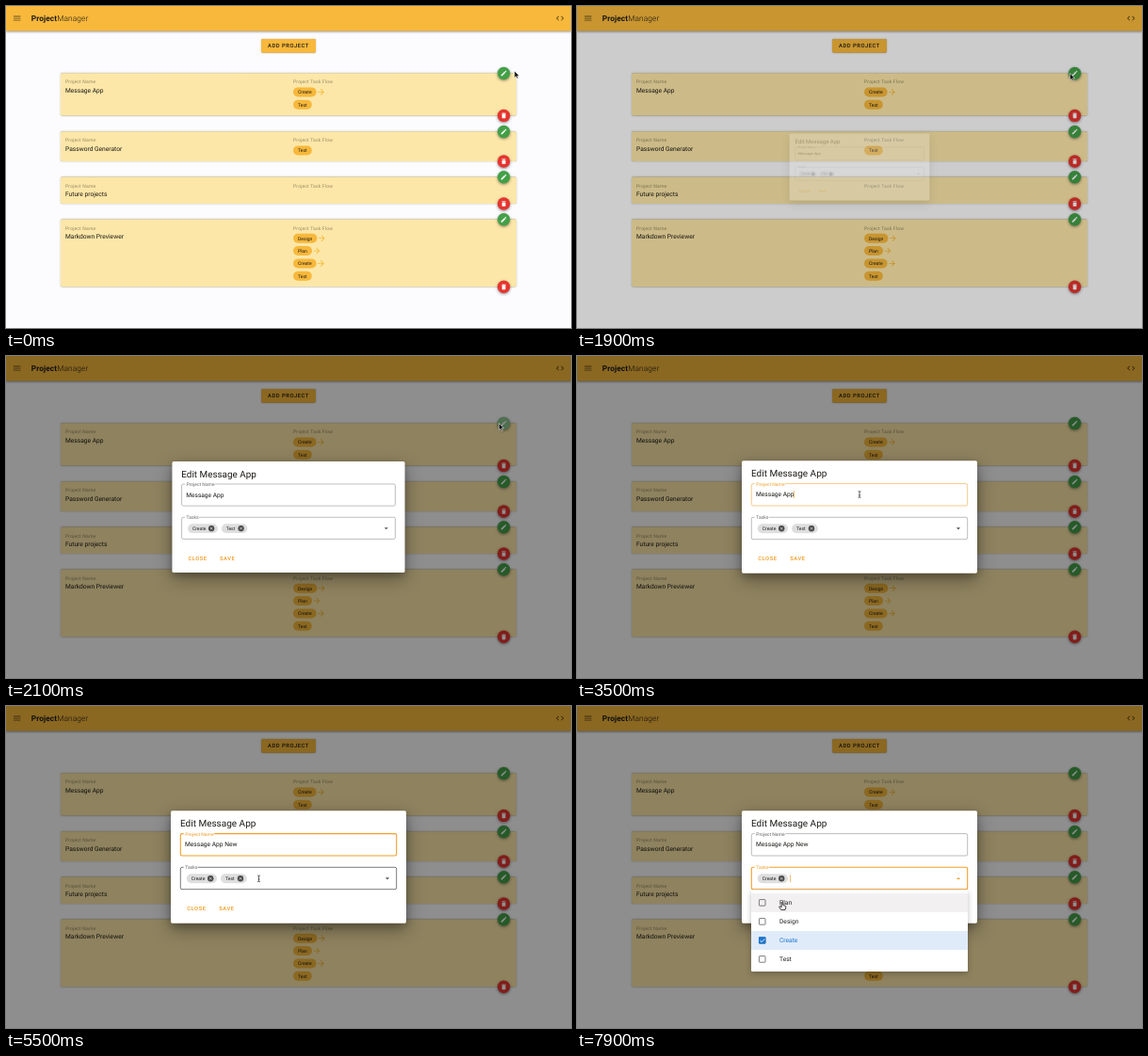
An HTML page that plays this animation: 600 px wide and 342 px high, repeating every 8 s.

```html
<!DOCTYPE html>
<html lang="en">
<head>
<meta charset="utf-8">
<title>Project list</title>
<style>
html, body { margin: 0; width: 100%; height: 100%; overflow: hidden; background: #fcfcfe; }
svg { display: block; width: 600px; height: 342px; font-family: Roboto, sans-serif; font-size: 6.67px; text-rendering: geometricPrecision; cursor: default; fill: #1c1a16; }
.caption { font-size: 5px; letter-spacing: .0333em; fill: #000; fill-opacity: .4; }
.label, .chip { font-size: 5px; }
.label { fill: #666; }
.button { font-size: 5.83px; font-weight: 500; letter-spacing: .0892em; }
.bar { filter: drop-shadow(0 1px 1.2px rgba(0,0,0,.4)); }
.raised { filter: drop-shadow(0 .8px .5px rgba(0,0,0,.35)) drop-shadow(0 .4px 1px rgba(0,0,0,.2)); }
.fab { filter: drop-shadow(0 1.3px 1.4px rgba(0,0,0,.45)); }
.floating { filter: drop-shadow(0 2px 3px rgba(0,0,0,.25)); }
.modal { filter: drop-shadow(0 3px 4px rgba(0,0,0,.2)) drop-shadow(0 6px 9px rgba(0,0,0,.35)); }
.field { fill: #fff; stroke: #999; stroke-width: .65; }
.hover .field { stroke: #333; }
.focus .field { stroke: #f2a02c; }
.focus .label, .focus .arrow { fill: #f2a02c; }
</style>
</head>
<body>
<svg id="stage" viewBox="0 0 600 342"></svg>
<script>
const AMBER = '#f7b83b', ORANGE = '#f0991c';
const LOOP = 8000, OPEN = 1880, FOCUS = 3440, MENU = 5900, UNCHECK = 6900;
const KEYS = [4000, 4200, 4400, 4550];

const ICONS = {
  menu: 'M3 6H21V8H3ZM3 11H21V13H3ZM3 16H21V18H3Z',
  code: 'M14.6 16.6L19.2 12L14.6 7.4L16 6L22 12L16 18ZM9.4 16.6L4.8 12L9.4 7.4L8 6L2 12L8 18Z',
  arrow: 'M4 11V13H16L10.5 18.5L11.9 19.9L19.8 12L11.9 4.1L10.5 5.5L16 11Z',
  pencil: 'M20.7 7Q21.3 6.3 20.7 5.6L18.4 3.3Q17.7 2.7 17 3.3L15.1 5.1L18.9 8.9ZM3 17.2V21H6.8L17.8 9.9L14.1 6.2Z',
  trash: 'M19 4H15.5L14.5 3H9.5L8.5 4H5V6H19ZM6 19A2 2 0 0 0 8 21H16A2 2 0 0 0 18 19V7H6Z',
  down: 'M7 10L12 15L17 10Z',
  close: 'M8 8L16 16M16 8L8 16'
};

const rect = (x, y, w, h, fill, rx = 0, extra = '') =>
  `<rect x="${x}" y="${y}" width="${w}" height="${h}" fill="${fill}" rx="${rx}" ${extra}/>`;
const text = (x, y, str, extra = '') => `<text x="${x}" y="${y}" ${extra}>${str}</text>`;
const icon = (name, cx, cy, size, fill, extra = '') =>
  `<path d="${ICONS[name]}" fill="${fill}" transform="translate(${cx} ${cy}) scale(${size / 24}) translate(-12 -12)" ${extra}/>`;

const cards = [
  { name: 'Message App', top: 71.2, bottom: 116.4, tasks: ['Create', 'Test'] },
  { name: 'Password Generator', top: 133.2, bottom: 165, tasks: ['Test'] },
  { name: 'Future projects', top: 181.4, bottom: 210, tasks: [] },
  { name: 'Markdown Previewer', top: 226.5, bottom: 298.3, tasks: ['Design', 'Plan', 'Create', 'Test'] }
];
const chipWidth = { Create: 24.6, Test: 19.8, Design: 25.4, Plan: 20 };

function flowChip(task, i, card) {
  const y = card.top + 20.2 + i * 13.35, w = chipWidth[task];
  return rect(305, y - 5, w, 10, AMBER, 5) + text(310, y + 1.8, task, 'class="chip"') +
    (i < card.tasks.length - 1 ? icon('arrow', 305 + w + 5, y, 10, AMBER) : '');
}

function cardView(card) {
  const { top, bottom, name, tasks } = card;
  return rect(58, top, 484, bottom - top, '#fce7a8', 1.7, 'class="raised"') +
    text(63, top + 11.1, 'Project Name', 'class="caption"') +
    text(63, top + 20.8, name) +
    text(305, top + 11.1, 'Project Task Flow', 'class="caption"') +
    tasks.map((task, i) => flowChip(task, i, card)).join('');
}

const fab = (y, fill, name) =>
  `<circle cx="528.6" cy="${y}" r="6.7" fill="${fill}" class="fab"/>` + icon(name, 528.6, y, 7.6, '#fff');

const fieldChip = (x, label, w) =>
  rect(x, 178.3, w, 10, '#dedede', 5) + text(x + 5, 185.1, label, 'class="chip"') +
  `<circle cx="${x + w - 6.8}" cy="183.3" r="3.2" fill="#4a4a4a"/>` +
  icon('close', x + w - 6.8, 183.3, 7.5, 'none', 'stroke="#eee" stroke-width="2"');

const field = (id, y, label, notch, body) =>
  `<g id="${id}">` + rect(185.3, y, 229.4, 23.4, '#fff', 1.7, 'class="field"') +
  rect(188.6, y - 1, notch, 2, '#fff') + text(190.3, y + 2, label, 'class="label"') + body + '</g>';

const options = ['Plan', 'Design', 'Create', 'Test'];
function optionView(name, i) {
  const y = 209 + i * 20, picked = name === 'Create';
  return rect(185, y - 10, 230, 20, picked ? '#e0ebf9' : '#f2f0f0', 0, picked ? '' : `id="row${i}"`) +
    rect(193.4, y - 3.4, 6.6, 6.6, 'none', .6, 'stroke="#666" stroke-width=".85"') +
    `<g id="check${i}">` + rect(193, y - 3.8, 7.4, 7.4, '#1976d2', .8) +
    `<path d="M194.4 ${y}l1.7 1.7l3.2 -3.3" fill="none" stroke="#fff" stroke-width=".9"/></g>` +
    text(215, y + 2.3, name, `fill="${picked ? '#1976d2' : '#222'}"`);
}

const stage = document.getElementById('stage');
stage.innerHTML =
  rect(0, 0, 600, 342, '#fcfcfe') +
  rect(0, 0, 600, 26.5, AMBER, 0, 'class="bar"') +
  icon('menu', 11.7, 13.1, 10, '#6b5120') + icon('code', 588.3, 13.1, 10, '#5a4518') +
  '<text x="26.7" y="16" font-size="8.33" letter-spacing=".0125em"><tspan font-weight="700">Project</tspan><tspan font-weight="300">Manager</tspan></text>' +
  rect(271, 35, 58, 14.8, AMBER, 1.7, 'class="raised"') + text(278, 44.4, 'ADD PROJECT', 'class="button"') +
  cards.map(cardView).join('') +
  cards.map(c => fab(c.top + .3, '#43a047', 'pencil') + fab(c.bottom, '#e6342e', 'trash')).join('') +
  '<circle id="ripple" cx="528.6" cy="71.5" r="6.7" fill="#fff"/>' +
  rect(0, 0, 600, 342, '#000', 0, 'id="shade"') +
  '<g id="dialog">' + rect(175, 111.3, 250, 119.5, '#fff', 1.7, 'class="modal"') +
  text(185, 128.3, 'Edit Message App', 'font-size="10"') +
  field('nameField', 135.6, 'Project Name', 32.6, text(190, 149.4, '', 'id="nameText"')) +
  field('taskField', 171.3, 'Tasks', 15,
    fieldChip(191.8, 'Create', 32.2) + '<g id="testChip">' + fieldChip(228, 'Test', 27.8) + '</g>' +
    '<g id="arrow">' + icon('down', 405, 183.2, 10, '#555', 'class="arrow"') + '</g>') +
  text(192.3, 217.1, 'CLOSE', `class="button" fill="${ORANGE}"`) +
  text(226.2, 217.1, 'SAVE', `class="button" fill="${ORANGE}"`) +
  rect(0, 0, .6, 8, ORANGE, 0, 'id="caret"') + '</g>' +
  '<g id="list">' + rect(185, 195.5, 230, 86.5, '#fff', 1.2, 'class="floating"') + options.map(optionView).join('') + '</g>' +
  '<g id="pointer"><path id="arrowCursor" d="M0 0V7.2L1.7 5.7L2.8 8.1L4 7.6L2.9 5.2H5.1Z" fill="#111" stroke="#fff" stroke-width=".5"/>' +
  '<path id="handCursor" d="M-.8 -2.8Q0 -4 .8 -2.8V-.4L3.3 .3Q4 .6 3.8 1.7L3 4.6H-1.2L-3.4 1.4Q-3.2 .3 -2 .9L-.8 1.8Z" fill="#fff" stroke="#111" stroke-width=".8"/>' +
  '<path id="beamCursor" d="M-1.4 -3.4Q0 -3.4 0 -2.5Q0 -3.4 1.4 -3.4M0 -2.5V2.5M-1.4 3.4Q0 3.4 0 2.5Q0 3.4 1.4 3.4M-.8 .9H.8" fill="none" stroke="#222" stroke-width=".7"/></g>';

const el = {};
stage.querySelectorAll('[id]').forEach(node => el[node.id] = node);
const clamp = v => Math.max(0, Math.min(1, v));
const show = (node, on) => node.style.display = on ? '' : 'none';
const fade = (node, v) => node.setAttribute('opacity', v);

// Pointer stops: time, x, y
const path = [
  [0, 540, 69], [1100, 540, 69], [1700, 524, 75], [1850, 524, 75], [1900, 523.5, 71.5],
  [2400, 523.5, 71.5], [3100, 300, 147], [4900, 300, 147], [5400, 268.5, 183.3],
  [6100, 268.5, 183.3], [6600, 218, 270], [7150, 218, 270], [7650, 218, 212], [LOOP, 218, 212]
];

function pointerAt(t) {
  const i = path.findIndex(p => p[0] > t);
  const [t0, x0, y0] = path[i - 1], [t1, x1, y1] = path[i];
  const u = (t - t0) / (t1 - t0), e = u * u * (3 - 2 * u);
  return [x0 + (x1 - x0) * e, y0 + (y1 - y0) * e];
}

// The outline thickens as a field gains focus
function styleField(node, focused, hovered, since) {
  node.setAttribute('class', focused ? 'focus' : hovered ? 'hover' : '');
  node.firstChild.style.strokeWidth = focused ? .5 + .6 * clamp((since - 50) / 150) : '';
}

function render(t) {
  const opened = t >= OPEN;
  const menuOpen = t >= MENU;
  const unchecked = t >= UNCHECK;

  fade(el.shade, .44 * clamp((t - 1855) / 105));
  fade(el.ripple, .4 * clamp((t - 1900) / 150) * clamp((2500 - t) / 250));

  const p = 1 - (1 - clamp((t - OPEN) / 309)) ** 3;
  show(el.dialog, opened);
  fade(el.dialog, clamp(p * 1.2));
  el.dialog.setAttribute('transform', `translate(300 171) scale(${.5 + .5 * p}) translate(-300 -171)`);

  const typed = KEYS.filter(k => k <= t).length;
  el.nameText.textContent = 'Message App' + ' New'.slice(0, typed);

  const [x, y] = pointerAt(t);
  const over = (top, bottom) => opened && x > 185 && x < 415 && y > top && y < bottom;
  const onName = over(135, 159), onTask = over(171, 195);
  styleField(el.nameField, t >= FOCUS && !menuOpen, onName, t - FOCUS);
  styleField(el.taskField, menuOpen, onTask, t - MENU);

  show(el.testChip, !unchecked);
  el.arrow.setAttribute('transform', `rotate(${180 * clamp((t - MENU) / 200)} 405 183.2)`);

  const lastInput = [FOCUS, ...KEYS, MENU, UNCHECK].filter(k => k <= t).pop();
  show(el.caret, t >= FOCUS && (t - lastInput) % 1000 < 500);
  const nameEnd = 230.4 + [0, 1.7, 6.4, 9.9, 14.9][typed];
  el.caret.setAttribute('x', menuOpen ? (unchecked ? 226.3 : 258.5) : nameEnd);
  el.caret.setAttribute('y', menuOpen ? 179.3 : 143);

  show(el.list, menuOpen);
  fade(el.list, clamp((t - MENU) / 200));
  options.forEach((name, i) => {
    if (el['row' + i]) show(el['row' + i], over(199 + i * 20, 219 + i * 20));
    show(el['check' + i], name === 'Create' || name === 'Test' && !unchecked);
  });

  const onFab = t < 1850 && Math.hypot(x - 528.6, y - 71.5) < 7;
  const hand = onFab || menuOpen && over(199, 279);
  const beam = !hand && (onName || onTask);
  el.pointer.setAttribute('transform', `translate(${x} ${y})`);
  show(el.pointer, t < KEYS[0] || t >= 4900);
  show(el.handCursor, hand);
  show(el.beamCursor, beam);
  show(el.arrowCursor, !hand && !beam);
}

const start = performance.now();
function tick() {
  render((performance.now() - start) % LOOP);
  requestAnimationFrame(tick);
}
tick();
</script>
</body>
</html>
```
